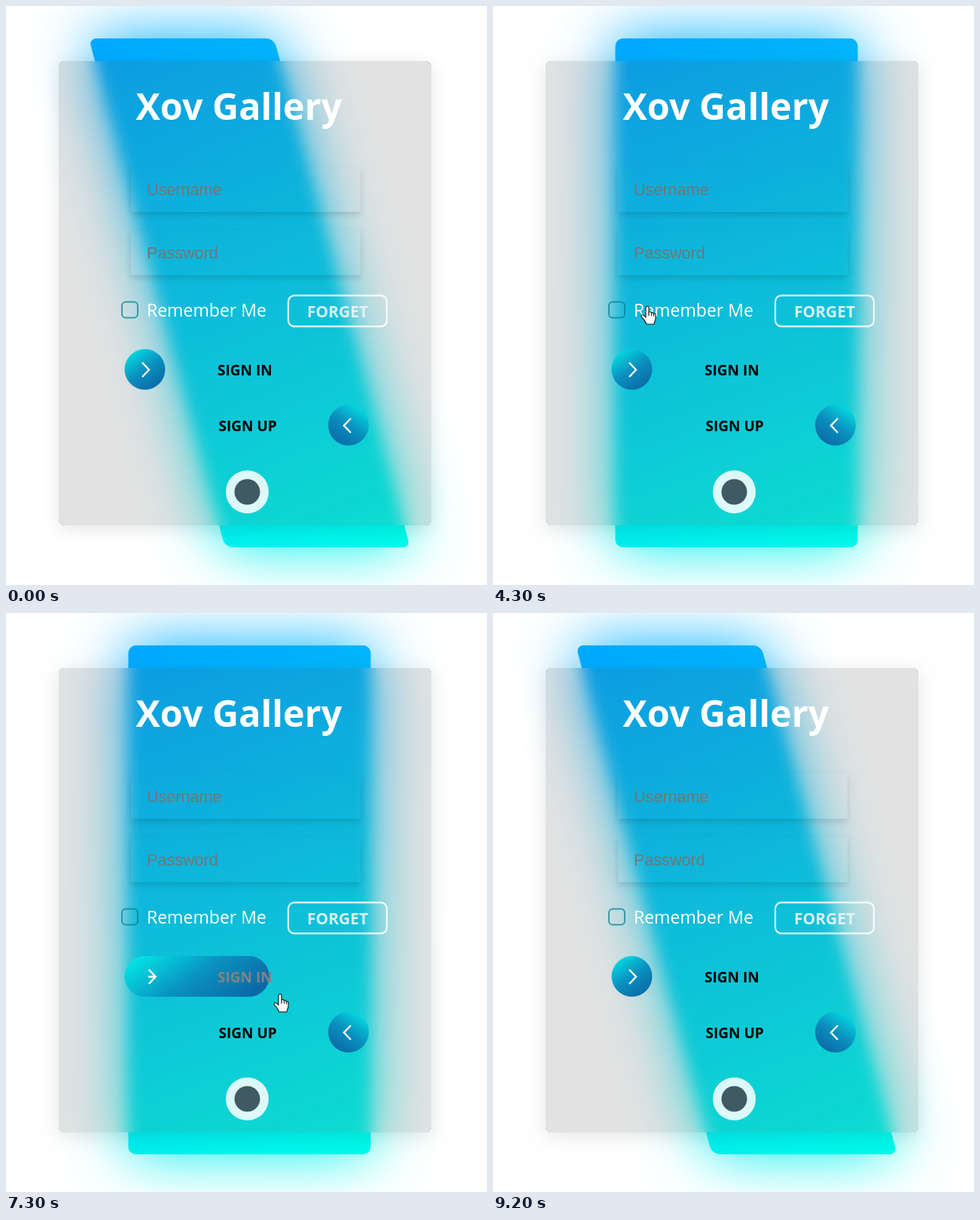
Recreate the animation shown at these times as an HTML page with a canvas. Size 639 by 768 pixels, loop 9300 ms.

```html
<!DOCTYPE html>
<html lang="en">
<head>
<meta charset="utf-8">
<title>Login form</title>
<style>
  html, body { margin: 0; width: 100%; height: 100%; overflow: hidden; background: #fff; }
  canvas { display: block; }
</style>
</head>
<body>
<canvas id="stage" width="639" height="768"></canvas>
<script>
const W = 639, H = 768, LOOP = 9300, STEP = 100;
const ctx = document.getElementById('stage').getContext('2d');
const backdrop = Object.assign(document.createElement('canvas'), { width: W, height: H });
const back = backdrop.getContext('2d');
const SANS = '"Open Sans", "Noto Sans", sans-serif';
const ARIAL = '"Liberation Sans", Arial, sans-serif';
const CJK = '"Noto Sans CJK SC", "Noto Sans CJK", sans-serif';

const clamp = v => Math.min(1, Math.max(0, v));
const mix = (a, b, p) => a + (b - a) * p;

function bezier(x1, y1, x2, y2) {
  const at = (a, b, s) => 3 * a * s * (1 - s) ** 2 + 3 * b * s * s * (1 - s) + s ** 3;
  return x => {
    if (x <= 0) return 0;
    if (x >= 1) return 1;
    let lo = 0, hi = 1;
    for (let i = 0; i < 24; i++) {
      const mid = (lo + hi) / 2;
      if (at(x1, x2, mid) < x) lo = mid; else hi = mid;
    }
    return at(y1, y2, lo);
  };
}
const ease = bezier(.25, .1, .25, 1);
const swift = bezier(.65, 0, .076, 1);

// Transition that runs forward from start and back from end.
function toggle(t, start, end, duration, curve = ease) {
  const rise = curve((Math.min(t, end) - start) / duration);
  return rise * (1 - curve((t - end) / duration));
}

// Linear gradient laid out over a box the way CSS does it.
function gradient(c, x, y, w, h, degrees, stops) {
  const a = degrees * Math.PI / 180, sx = Math.sin(a), sy = -Math.cos(a);
  const half = (Math.abs(w * sx) + Math.abs(h * sy)) / 2;
  const cx = x + w / 2, cy = y + h / 2;
  const g = c.createLinearGradient(cx - sx * half, cy - sy * half, cx + sx * half, cy + sy * half);
  stops.forEach((color, i) => g.addColorStop(i / (stops.length - 1), color));
  return g;
}

function box(c, x, y, w, h, r) {
  c.beginPath();
  c.roundRect(x, y, w, h, r);
}

function outerShadow(x, y, w, h, r, offset, blur, color) {
  ctx.save();
  ctx.beginPath();
  ctx.rect(0, 0, W, H);
  ctx.roundRect(x, y, w, h, r);
  ctx.clip('evenodd');
  ctx.shadowColor = color;
  ctx.shadowBlur = blur;
  ctx.shadowOffsetY = offset;
  ctx.fillStyle = '#000';
  box(ctx, x, y, w, h, r);
  ctx.fill();
  ctx.restore();
}

function text(str, x, y, font, color) {
  ctx.font = font;
  ctx.fillStyle = color;
  ctx.fillText(str, x, y);
}

function disc(x, y, r, color) {
  ctx.beginPath();
  ctx.arc(x, y, r, 0, Math.PI * 2);
  ctx.fillStyle = color;
  ctx.fill();
}

function drawBackdrop(p) {
  const w = mix(246, 322, p), h = 675;
  back.fillStyle = '#fff';
  back.fillRect(0, 0, W, H);
  for (const filter of ['blur(41px)', 'none']) {
    back.save();
    back.filter = filter;
    back.translate(323.5, 380.5);
    back.transform(1, 0, Math.tan(Math.PI / 12) * (1 - p), 1, 0, 0);
    back.fillStyle = gradient(back, -w / 2, -h / 2, w, h, 160, ['#00a8ff', '#00faea']);
    box(back, -w / 2, -h / 2, w, h, 10);
    back.fill();
    back.restore();
  }
  ctx.drawImage(backdrop, 0, 0);
}

function drawCard() {
  outerShadow(70, 73, 495, 616, 8, 5, 25, 'rgba(0,0,0,.1)');
  ctx.save();
  box(ctx, 70, 73, 495, 616, 8);
  ctx.clip();
  ctx.filter = 'blur(10px)';
  ctx.drawImage(backdrop, 0, 0);
  ctx.filter = 'none';
  ctx.fillStyle = 'rgba(80,80,80,.165)';
  ctx.fillRect(70, 73, 495, 616);
  ctx.restore();
  text('Xov Gallery', 172.5, 151, `bold 48.5px ${SANS}`, '#fff');
}

function drawField(label, bottom, focus, caret) {
  outerShadow(166, bottom - 60, 305, 60, 0, 4, 8, 'rgba(0,0,0,.13)');
  text(label, 187, bottom - 22, `21.6px ${ARIAL}`, '#757575');
  if (focus > 0) {
    ctx.fillStyle = gradient(ctx, 166, 0, 305, 1, 90, ['#1496eb', '#14a8ee', '#0ae1e6', '#e8feff', '#fff']);
    ctx.fillRect(166, bottom - 3, 304 * focus, 3);
  }
  if (caret) {
    ctx.fillStyle = '#fff';
    ctx.fillRect(187, bottom - 41, 1.5, 24);
  }
}

function drawRemember() {
  ctx.lineWidth = 2;
  ctx.strokeStyle = 'rgba(0,125,145,.7)';
  box(ctx, 154, 392.5, 21, 21, 5);
  ctx.stroke();
  text('Remember Me', 187, 412, `23px ${SANS}`, '#fff');
}

function drawForget(p) {
  if (p > 0) {
    ctx.save();
    ctx.globalAlpha = p;
    outerShadow(374, 384, 134, 42, 8, 6, 14, 'rgba(0,0,0,.28)');
    const dx = mix(-6, 5, p), dy = 4 * p;
    ctx.fillStyle = gradient(ctx, 374, 383, 138, 44, 90, ['#10c8e0', '#1cc2ea', '#22b4ec']);
    box(ctx, 374 + dx, 383 + dy, 133, 40, 7);
    ctx.fill();
    text('CLICK', 419 + dx, 410 + dy, `bold 19px ${SANS}`, '#fff');
    ctx.restore();
  }
  ctx.lineWidth = 2.3;
  ctx.strokeStyle = `rgba(255,255,255,${mix(.82, .2, p)})`;
  box(ctx, 375, 384, 131, 41, 8);
  ctx.stroke();
  text('FORGET', 400, 413, `bold 21px ${SANS}`, `rgba(240,244,245,${.9 * (1 - p)})`);
}

// dir 1 grows to the right from the left end, -1 the other way.
function drawPill(label, x, y, dir, p) {
  const w = mix(54, 324, p), left = dir > 0 ? 157.5 : 482 - w;
  const colors = ['#02f0ea', '#0a90bf', '#0a5f9f'];
  ctx.fillStyle = gradient(ctx, left, y - 27, w, 54, dir > 0 ? 145 : 215, colors);
  box(ctx, left, y - 27, w, 54, 27);
  ctx.fill();

  const tip = (dir > 0 ? 191 : 448) + dir * 17 * p;
  ctx.strokeStyle = '#fff';
  ctx.lineWidth = 2.4;
  ctx.beginPath();
  ctx.moveTo(tip - dir * 10, y - 9);
  ctx.lineTo(tip - dir, y + .5);
  ctx.lineTo(tip - dir * 10, y + 10);
  if (p > 0) {
    ctx.moveTo(tip - dir, y + .5);
    ctx.lineTo(tip - dir * 21 * p, y + .5);
  }
  ctx.stroke();
  const shade = Math.round(255 * p);
  text(label, x, y + 7.5, `bold 19px ${SANS}`, `rgb(${shade},${shade},${shade})`);
}

function drawTooltip() {
  const tail = new Path2D('M178 370L190.5 358L203 370Z');
  outerShadow(166, 370, 135, 63, 4, 1, 5, 'rgba(0,0,0,.3)');
  ctx.fillStyle = '#fff';
  ctx.fill(tail);
  box(ctx, 166, 369.5, 135, 64, 4);
  ctx.fill();
  text('halvomery', 177.5, 393, `bold 15px ${SANS}`, '#1fab8d');
  text('安全键盘输入已启用', 177, 420, `12.4px ${CJK}`, '#222');
  ctx.strokeStyle = '#7d8b8f';
  ctx.lineWidth = 2;
  ctx.stroke(new Path2D('M281 381L289 389M289 381L281 389'));
}

const SHAPES = {
  arrow: new Path2D('M0 0V17L4 13.2L6.8 19.6L9.6 18.4L6.9 12.2H12Z'),
  hand: new Path2D('M-2 1.5Q0 -1 2 1.5V8Q4 6.5 5.5 9Q7.5 8 8.5 10.2Q11 9.5 11 12V17Q10 20 9 24H-1Q-3 19 -8 14Q-8 10.5 -4.5 12.5L-2 15Z'),
  beam: new Path2D('M-5 -9H5M0 -9V10M-5 10H5')
};

// Time, x, y and the pointer shape from then on.
const PATH = [
  [800, 180, 110, 'arrow'], [1000, 206, 208, 'arrow'], [1300, 225, 234, 'beam'],
  [1700, 236, 246, 'beam'], [2300, 238, 250, 'beam'], [2500, 239, 305, 'beam'],
  [2800, 241, 328, 'beam'], [3400, 243, 341, 'beam'], [3600, 232, 364, 'arrow'],
  [3900, 212, 394, 'hand'], [4300, 205, 398, 'hand'], [4900, 209, 414, 'arrow'],
  [5200, 220, 424, 'arrow'], [5600, 400, 412, 'hand'], [6000, 446, 410, 'hand'],
  [6600, 449, 414, 'hand'], [7000, 430, 424, 'arrow'], [7150, 385, 465, 'hand'],
  [7400, 350, 532, 'hand'], [7900, 344, 575, 'hand'], [8000, 335, 614, 'arrow'],
  [8300, 340, 665, 'arrow'], [8500, 350, 725, 'arrow'], [8600, 355, 790, 'arrow']
];

function drawPointer(t) {
  const i = PATH.findIndex(point => point[0] > t);
  if (i < 1) return;
  const [t0, x0, y0, kind] = PATH[i - 1], [t1, x1, y1] = PATH[i];
  const p = clamp((t - t0) / (t1 - t0));
  ctx.save();
  ctx.translate(mix(x0, x1, p), mix(y0, y1, p));
  ctx.lineJoin = 'round';
  if (kind === 'beam') {
    ctx.strokeStyle = '#b4584c';
    ctx.lineWidth = 2;
    ctx.stroke(SHAPES.beam);
  } else {
    ctx.fillStyle = '#fff';
    ctx.fill(SHAPES[kind]);
    ctx.strokeStyle = '#222';
    ctx.lineWidth = 1.2;
    ctx.stroke(SHAPES[kind]);
    if (kind === 'hand') ctx.stroke(new Path2D('M2 8V13M5.5 9V13M8.5 10.5V13.5'));
  }
  ctx.restore();
}

function render(t) {
  const between = (a, b) => t >= a && t < b;
  drawBackdrop(toggle(t, 725, 8650, 500));
  drawCard();
  drawField('Username', 273, toggle(t, 1760, 2530, 300), between(1900, 2300));
  drawField('Password', 357, toggle(t, 2530, 3560, 300), between(2600, 3100));
  drawRemember();
  drawForget(toggle(t, 5580, 6950, 300));
  drawPill('SIGN IN', 281, 482, 1, toggle(t, 7120, 7400, 450, swift));
  drawPill('SIGN UP', 282.5, 556, -1, toggle(t, 7400, 7980, 450, swift));
  disc(320.5, 644.5, 28.5, 'rgba(255,255,255,.86)');
  disc(320.5, 644.5, 17, '#3f5a62');
  if (between(2600, 3500)) drawTooltip();
  drawPointer(t);
}

const started = performance.now();
let shown = -1;
function frame() {
  const t = Math.floor((performance.now() - started) % LOOP / STEP) * STEP;
  if (t !== shown) render(shown = t);
  requestAnimationFrame(frame);
}
frame();
</script>
</body>
</html>
```
